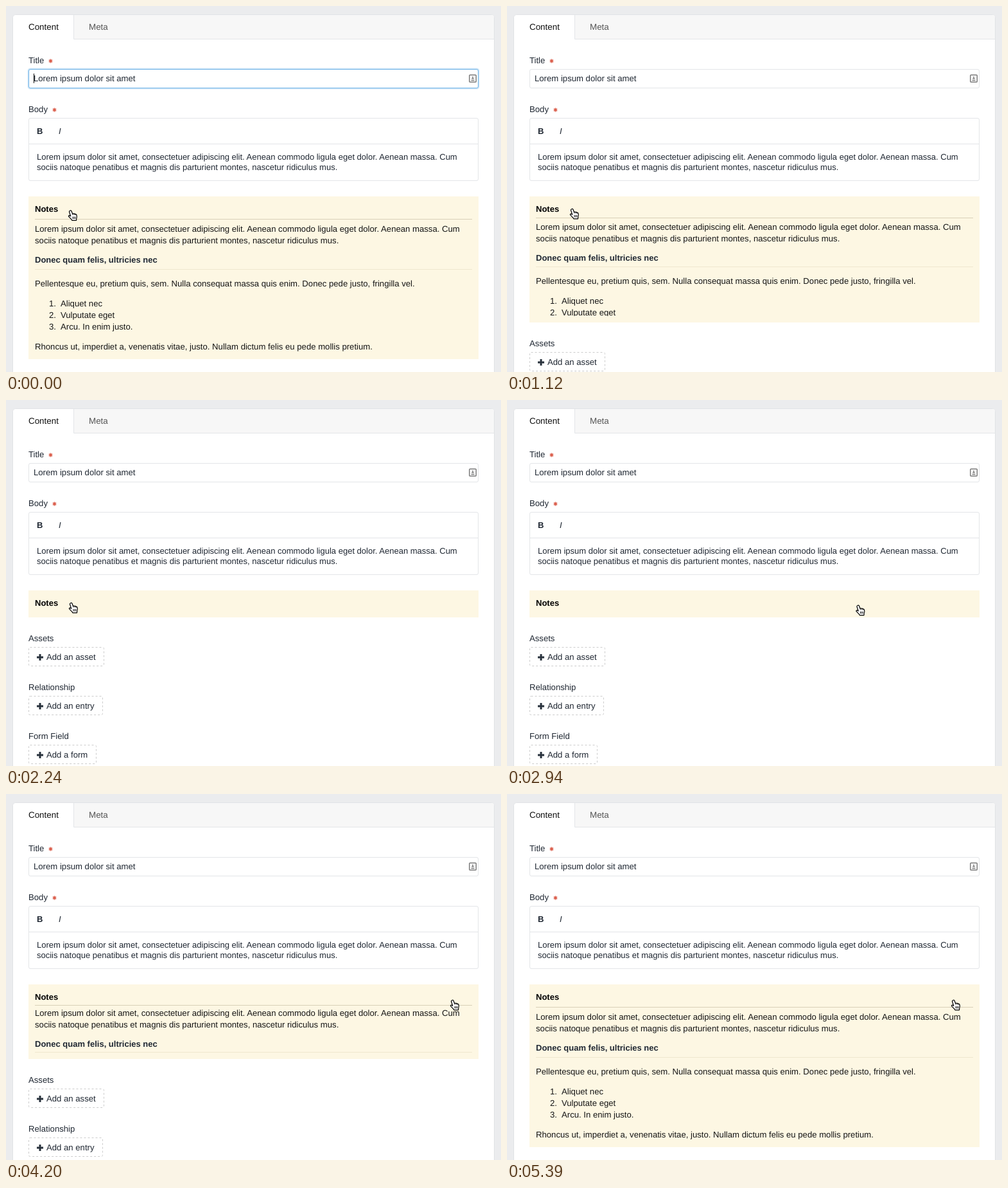
An HTML page for the animation above (5.46 s loop, 771 by 569 pixels).

```html
<!DOCTYPE html>
<html lang="en">
<head>
<meta charset="utf-8">
<title>Collapsible notes</title>
<style>
  html, body { margin: 0; width: 771px; height: 569px; overflow: hidden; background: #ebecee; }
  svg { display: block; }
  text { font: 13.15px "Liberation Sans", Arial, sans-serif; fill: #202833; text-rendering: geometricPrecision; white-space: pre; }
  .bold { font-weight: bold; font-size: 13px; }
  .body { font-size: 13px; }
  .tab { font-size: 13.4px; }
  .note { fill: #161616; }
  .box { fill: #fff; stroke: #e3e5e8; }
  .dash { fill: none; stroke: #ccc; stroke-dasharray: 3 3; }
</style>
</head>
<body>
<svg width="771" height="569" viewBox="0 0 771 569">
  <defs>
    <clipPath id="clip"><rect id="clipBox" x="35" y="322" width="701"/></clipPath>
    <path id="star" d="M0-3V3M-2.6-1.5L2.6 1.5M-2.6 1.5L2.6-1.5" stroke="#da5a47" stroke-width="1.6"/>
    <path id="plus" d="M-5 0H5M0-5V5" stroke="#29323d" stroke-width="3"/>
  </defs>

  <rect x="10.5" y="13.5" width="750" height="570" rx="4" fill="#fff" stroke="#e1e3e6"/>
  <path d="M106 14H757a3 3 0 0 1 3 3V51H106Z" fill="#f7f7f7"/>
  <path d="M105.5 14V51.5H760" fill="none" stroke="#e3e5e8"/>

  <rect id="glow" x="35.5" y="98.5" width="700" height="29" rx="2.5" fill="none" stroke="#cfe6f8" stroke-width="4"/>
  <rect id="field" class="box" x="35.5" y="98.5" width="700" height="29" rx="2.5"/>
  <path id="caret" d="M43.5 105V120" stroke="#111"/>
  <g fill="none" stroke="#7c7c7c" stroke-width="1.5">
    <rect x="721.75" y="107.25" width="10.5" height="11" rx="1"/>
    <path d="M724.5 115.5H729.5M727 109.5V113.5M725.3 112.7H728.7"/>
  </g>
  <rect class="box" x="35.5" y="174.5" width="700" height="97" rx="2.5"/>
  <path d="M36 214.5H735" stroke="#e3e5e8"/>
  <use href="#star" x="69.5" y="85.5"/>
  <use href="#star" x="75.5" y="161.5"/>
  <g id="form"></g>

  <rect id="panel" x="35" y="296" width="701" fill="#fdf7e3"/>
  <text class="bold" x="45" y="320" style="fill:#000">Notes</text>
  <g clip-path="url(#clip)">
    <path id="rule" d="M45 .5H726" stroke="#d9d0b8"/>
    <g id="intro"></g>
    <g id="rest"><path d="M45 409.5H726" stroke="#efe7cf"/></g>
  </g>
  <g id="lower"></g>

  <g id="hand" stroke="#000" stroke-linejoin="round">
    <path fill="#fff" stroke-width="1.2" d="M3 1.2Q4.6 .2 5.6 2L7 6Q8 5.2 9.3 6Q10.6 5.4 11.5 6.6Q13 6.3 13.5 8Q14.3 11 13.3 13L13 16.3H6.5L5.5 14.8L1 10.2Q.6 8.6 2.3 8.7L4.2 9.8L2 3Q1.8 1.8 3 1.2Z"/>
    <path fill="none" stroke-width=".9" d="M7 6L7.6 8M9.3 6L9.9 8M11.5 6.6L11.9 8.2M7.5 10.5V14M9.4 10.5V14M11.3 10.5V14"/>
  </g>
</svg>
<script>
const $ = id => document.getElementById(id);
const LOOP = 5460, SLIDE = 275, CLOSE = 1024, OPEN = 4089, BLUR = 980;

function add(parent, tag, attrs, text = '') {
  const el = document.createElementNS('http://www.w3.org/2000/svg', tag);
  for (const key in attrs) el.setAttribute(key, attrs[key]);
  el.textContent = text;
  $(parent).append(el);
  return el;
}
const write = (parent, x, y, text, cls = '') => add(parent, 'text', { x, y, class: cls }, text);

const lorem = [
  'Lorem ipsum dolor sit amet, consectetuer adipiscing elit. Aenean commodo ligula eget dolor. Aenean massa. Cum',
  'sociis natoque penatibus et magnis dis parturient montes, nascetur ridiculus mus.'
];

write('form', 35, 37, 'Content', 'tab').style.fill = '#111';
write('form', 129, 37, 'Meta', 'tab').style.fill = '#555';
write('form', 35, 89, 'Title');
write('form', 43, 117, 'Lorem ipsum dolor sit amet');
write('form', 35, 165, 'Body');
write('form', 48, 199, 'B', 'bold');
write('form', 82, 199, 'I').style.fontStyle = 'italic';
lorem.forEach((line, i) => {
  write('form', 48, 239 + 16 * i, line, 'body');
  write('intro', 45, 351 + 18 * i, line, 'note');
});
write('intro', 45, 399, 'Donec quam felis, ultricies nec', 'bold');
write('rest', 45, 436, 'Pellentesque eu, pretium quis, sem. Nulla consequat massa quis enim. Donec pede justo, fringilla vel.', 'note');
['Aliquet nec', 'Vulputate eget', 'Arcu. In enim justo.'].forEach((item, i) => {
  write('rest', 67, 467 + 18 * i, `${i + 1}.`, 'note');
  write('rest', 85, 467 + 18 * i, item, 'note');
});
write('rest', 45, 534, 'Rhoncus ut, imperdiet a, venenatis vitae, justo. Nullam dictum felis eu pede mollis pretium.', 'note');

// Positions below the panel are relative to its bottom edge.
[['Assets', 'Add an asset', 117], ['Relationship', 'Add an entry', 115], ['Form Field', 'Add a form', 105]]
  .forEach(([label, action, width], i) => {
    const y = 76 * i;
    write('lower', 35, y + 37, label);
    add('lower', 'rect', { class: 'dash', x: 35.5, y: y + 46.5, width, height: 29, rx: 2 });
    add('lower', 'use', { href: '#plus', x: 53, y: y + 62 });
    write('lower', 63, y + 66, action);
  });

const swing = (t, start, length) => {
  const p = Math.min(1, Math.max(0, (t - start) / length));
  return 0.5 - Math.cos(Math.PI * p) / 2;
};
const move = (id, x, y) => $(id).setAttribute('transform', `translate(${x} ${y})`);

function draw(now) {
  const t = now % LOOP;
  const open = 1 - swing(t, CLOSE, SLIDE) + swing(t, OPEN, SLIDE);
  const shut = 1 - open;
  const bottom = Math.round(338 + 211 * open);

  $('panel').setAttribute('height', bottom - 296);
  $('clipBox').setAttribute('height', open > 0 ? bottom - 332 : 0);
  move('rule', 0, Math.floor(328 + 3 * open ** 1.3));
  move('intro', 0, Math.round(-0.2 - 9 * shut));
  move('rest', 0, Math.round(-0.45 - 12 * shut));
  move('lower', 0, bottom);

  const focus = t < BLUR;
  $('glow').style.display = focus ? '' : 'none';
  $('field').style.stroke = focus ? '#6fb3e6' : '';
  $('caret').style.display = focus && t % 1060 < 530 ? '' : 'none';

  const nudge = swing(t, 600, 380), travel = swing(t, 2520, 630);
  move('hand', 96.5 + nudge + 594 * travel, 317 - 2.5 * nudge + 5 * travel);
}

let start;
function tick(now) {
  start ??= now;
  draw(now - start);
  requestAnimationFrame(tick);
}
draw(0);
requestAnimationFrame(tick);
</script>
</body>
</html>
```
